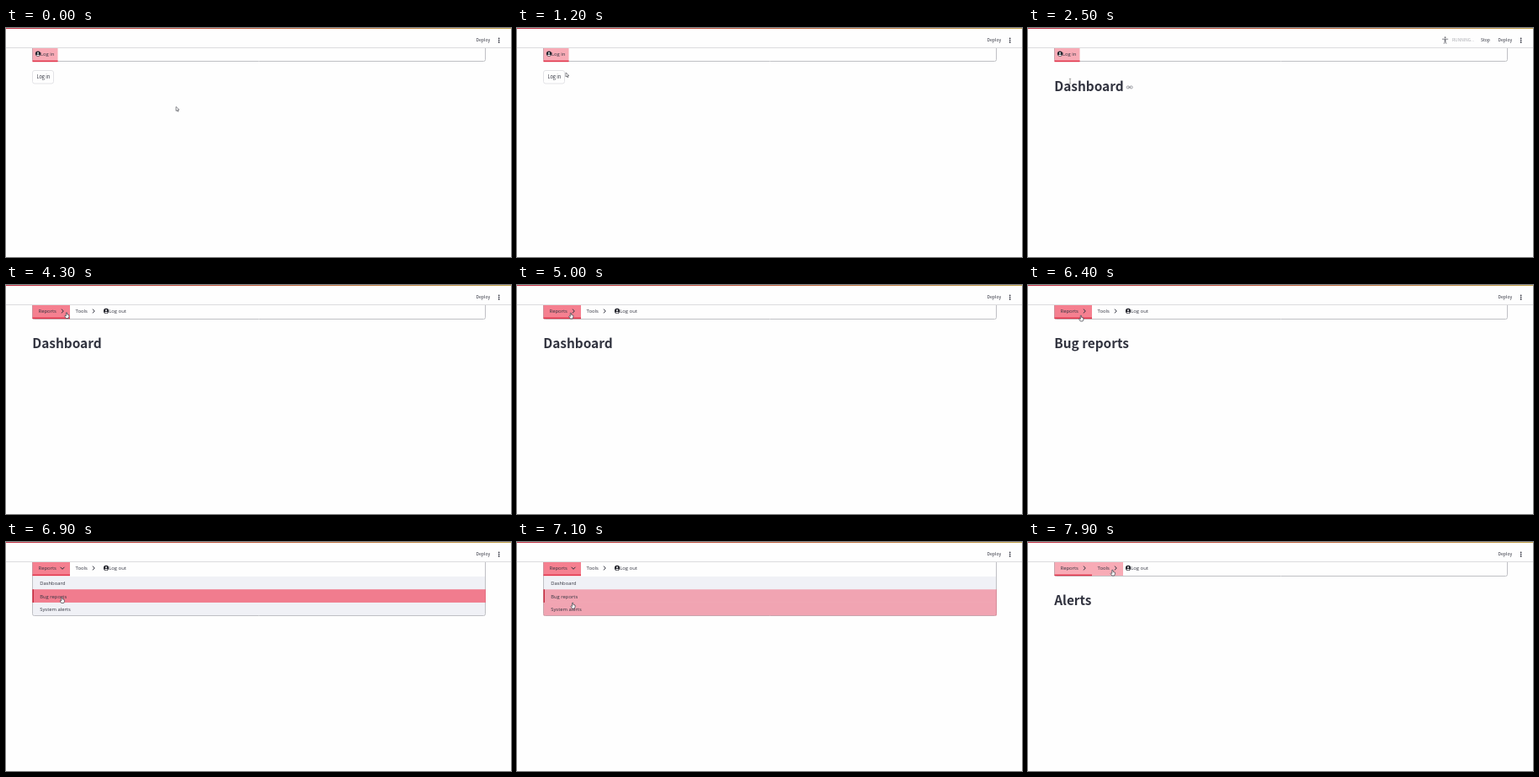
Write an HTML page with a canvas that moves like this. It is 600 px wide and 272 px high and loops after 8000 ms.

```html
<!DOCTYPE html>
<html lang="en">
<head>
<meta charset="utf-8">
<title>Navigation bar demo</title>
<style>
html, body { margin: 0; width: 100%; height: 100%; overflow: hidden; background: #fefefe; }
canvas { display: block; }
</style>
</head>
<body>
<canvas id="stage" width="600" height="272"></canvas>
<script>
const ctx = document.getElementById('stage').getContext('2d');
const LOOP = 8000, STEP = 100;
const INK = '#31333f', RED = '#e0344a', GREY = '#a9aab0';
const SANS = '"Noto Sans CJK JP", "Noto Sans CJK", "Noto Sans", sans-serif';
const NAV = '"Open Sans", "Noto Sans", sans-serif';
const TINT = 'rgba(240,80,104,0.48)';
const ROWS = ['Dashboard', 'Bug reports', 'System alerts'];

// Pointer keys: time, x, y; straight moves between keys
const PATH = [
  [0, 202, 93.5], [100, 202, 93.5], [200, 200, 108], [300, 201, 122.5], [600, 201, 122.5],
  [700, 120, 75], [800, 72, 47], [900, 72, 47], [1000, 68.5, 45], [1100, 68.5, 45],
  [1200, 58, 53], [1300, 50, 60], [3200, 50, 60], [3300, 92, 64], [3400, 118, 66],
  [3500, 118, 66], [3600, 131, 88.5], [3700, 131, 88.5], [3800, 121, 78], [3900, 108, 68.5],
  [4000, 108, 68.5], [4200, 75, 36], [4300, 72, 32.5], [4400, 71, 34], [4600, 66, 46],
  [4700, 64, 45], [4900, 57, 33], [5000, 64, 33], [5100, 72, 33], [5300, 72, 33],
  [5500, 74, 64.5], [6000, 74, 64.5], [6300, 63, 36], [6500, 63, 36], [6700, 64, 50],
  [6900, 66.5, 65.5], [7000, 66.5, 67], [7200, 66, 77], [7500, 66, 77], [7900, 100.5, 33]
];

const within = (t, spans) => spans.some(([a, b]) => t >= a && t < b);

function pointer(t) {
  let i = PATH.findIndex(k => k[0] > t);
  if (i < 0) return PATH[PATH.length - 1].slice(1);
  const [t0, x0, y0] = PATH[i - 1], [t1, x1, y1] = PATH[i];
  const p = (t - t0) / (t1 - t0);
  return [x0 + (x1 - x0) * p, y0 + (y1 - y0) * p];
}

function text(str, x, y, size, color = INK, family = NAV, weight = 400) {
  ctx.font = `${weight} ${size}px ${family}`;
  ctx.fillStyle = color;
  ctx.fillText(str, x, y);
}

function rect(x, y, w, h, color) {
  ctx.fillStyle = color;
  ctx.fillRect(x, y, w, h);
}

function line(points, color, width) {
  ctx.beginPath();
  points.forEach(([x, y]) => ctx.lineTo(x, y));
  ctx.strokeStyle = color;
  ctx.lineWidth = width;
  ctx.stroke();
}

function dot(x, y, r, color) {
  ctx.beginPath();
  ctx.arc(x, y, r, 0, Math.PI * 2);
  ctx.fillStyle = color;
  ctx.fill();
}

function box(x, y, w, h, r, fill, stroke) {
  ctx.beginPath();
  ctx.roundRect(x, y, w, h, r);
  ctx.fillStyle = fill;
  ctx.fill();
  ctx.strokeStyle = stroke;
  ctx.lineWidth = 1;
  ctx.stroke();
}

function chevron(x, y, down) {
  const pts = [[-1.2, -2.4], [1.3, 0], [-1.2, 2.4]];
  line(pts.map(([a, b]) => down ? [x + b, y + a] : [x + a, y + b]), INK, 1);
}

function userIcon(x, y) {
  dot(x, y, 3.1, '#22232b');
  dot(x, y - 0.9, 0.95, '#fff');
  ctx.beginPath();
  ctx.ellipse(x, y + 1.7, 1.7, 0.9, 0, 0, Math.PI * 2);
  ctx.fill();
}

function linkIcon(x, y) {
  ctx.strokeStyle = '#85868d';
  ctx.lineWidth = 0.8;
  for (const dx of [0, 3.8]) {
    ctx.beginPath();
    ctx.roundRect(x + dx, y - 1.5, 3.2, 3, 1.5);
    ctx.stroke();
  }
  line([[x + 2, y], [x + 5, y]], '#85868d', 0.7);
}

function header(running) {
  rect(0, 0, 600, 23, '#fefefe');
  const g = ctx.createLinearGradient(0, 0, 600, 0);
  g.addColorStop(0, '#c5364a');
  g.addColorStop(0.5, '#c0603f');
  g.addColorStop(1, '#c2a24c');
  rect(0, 0, 600, 1, g);
  rect(0, 23, 600, 1, '#dcdcde');
  text('Deploy', 558.5, 16.3, 5.1, INK, SANS);
  for (const y of [12.3, 14.6, 16.9]) dot(585.7, y, 0.85, INK);
  if (!running) return;
  dot(495.6, 11.2, 1, '#77787f');
  line([[492, 13.2], [499.2, 13.2]], '#77787f', 0.9);
  line([[495.6, 13], [495.6, 16]], '#77787f', 1.8);
  line([[494.2, 18.8], [495.6, 15.5], [497, 18.8]], '#77787f', 0.9);
  text('RUNNING...', 504, 16.3, 4.9, GREY, SANS);
  text('Stop', 538, 16.3, 5.1, INK, SANS);
}

function tab(x, w, active, hover) {
  for (const on of [active, hover]) if (on) rect(x, 24, w, 16, TINT);
  if (active) rect(x, 38.6, w, 1.6, RED);
}

function menu(x, y, s) {
  box(31.5, 18.5, 538, s.open ? 69 : s.full ? 22 : 21, 2, s.open ? '#f0f1f6' : '#fefefe', '#bfc0c4');
  if (!s.full) {
    tab(31.5, 30, true, false);
    userIcon(38, 30.6);
    text('Log in', 41, 33.1, 5.9);
    return;
  }
  if (s.open) rect(32, 24, 537, 17, '#fefefe');
  const onNav = y < 41;
  tab(31.5, 44.5, true, s.full && (s.open || onNav && x < 76));
  tab(76, 37, false, onNav && x >= 76 && x < 113);
  text('Reports', 38.5, 33, 5.9);
  chevron(67, 31, s.open);
  text('Tools', 82.6, 33, 5.9);
  chevron(104, 31, false);
  userIcon(119, 30.9);
  text('Log out', 122.2, 33.4, 5.9);
  if (!s.open) return;
  ROWS.forEach((name, i) => {
    const top = 40.7 + i * 15.6;
    const hover = y >= top && y < top + 15.6;
    if (hover) rect(31.5, top, 538.5, 15.6, TINT);
    if (i === s.row) {
      rect(31.5, top, 538.5, 15.6, TINT);
      rect(31.5, top, 1.5, 15.6, '#c92f43');
    }
    text(name, 40.2, top + 10.2, 5.85);
  });
}

function arrow(x, y) {
  ctx.beginPath();
  [[0, 0], [0, 5], [1.2, 4], [2, 5.8], [2.9, 5.4], [2.1, 3.7], [3.8, 3.6]]
    .forEach(([a, b]) => ctx.lineTo(x + a, y + b));
  ctx.closePath();
  ctx.fillStyle = '#fff';
  ctx.fill();
  ctx.strokeStyle = '#55565e';
  ctx.lineWidth = 0.7;
  ctx.stroke();
}

function hand(x, y) {
  ctx.beginPath();
  [[-0.7, 0.3], [0.5, 0.3], [0.6, 2.4], [2.8, 3], [2.9, 5], [2.1, 7], [-0.8, 7], [-2.4, 4.4], [-1.8, 3.8], [-0.7, 4.5]]
    .forEach(([a, b]) => ctx.lineTo(x + a, y + b));
  ctx.closePath();
  ctx.fillStyle = '#fff';
  ctx.fill();
  ctx.strokeStyle = '#3c3d45';
  ctx.lineWidth = 0.7;
  ctx.stroke();
}

function beam(x, y) {
  line([[x, y + 0.3], [x, y + 6]], '#777', 0.7);
  for (const dy of [0.3, 6]) line([[x - 1.2, y + dy], [x + 1.2, y + dy]], '#777', 0.6);
}

function draw(t) {
  const [x, y] = pointer(t);
  const s = {
    full: t >= 2700,
    open: within(t, [[4400, 4800], [5300, 5800], [6500, 7400]]),
    row: t < 5700 ? 0 : t < 7300 ? 1 : 2,
    running: within(t, [[2500, 2800], [5800, 6100], [7400, 7700]])
  };
  const title = t < 2500 ? '' : t < 5800 ? 'Dashboard' : t < 7400 ? 'Bug reports' : 'Alerts';
  const onButton = !title && x > 31 && x < 57 && y > 50 && y < 66;
  const onTitle = title && !s.open && y > 55 && y < 82;
  const onMenu = s.full && (y < 41 && x < 146 || s.open);

  rect(0, 0, 600, 272, '#fefefe');
  if (title) {
    text(title, 31.2, 74.8, 15.4, INK, SANS, 700);
    if (onTitle) linkIcon(31.2 + ctx.measureText(title).width + 3.6, 70.4);
  } else {
    box(31.5, 50.5, 25, 15.5, 2.5, '#fefefe', onButton ? '#ff6b6b' : '#e3e3e6');
    text('Log in', 36.4, 60.4, 5.65, onButton ? '#ff4b4b' : INK, SANS);
  }
  menu(x, y, s);
  header(s.running);
  (onButton || onMenu ? hand : onTitle ? beam : arrow)(x, y);
}

const start = performance.now();
function frame() {
  const t = (performance.now() - start) % LOOP;
  draw(Math.floor(t / STEP) * STEP);
  requestAnimationFrame(frame);
}
draw(0);
requestAnimationFrame(frame);
</script>
</body>
</html>
```
